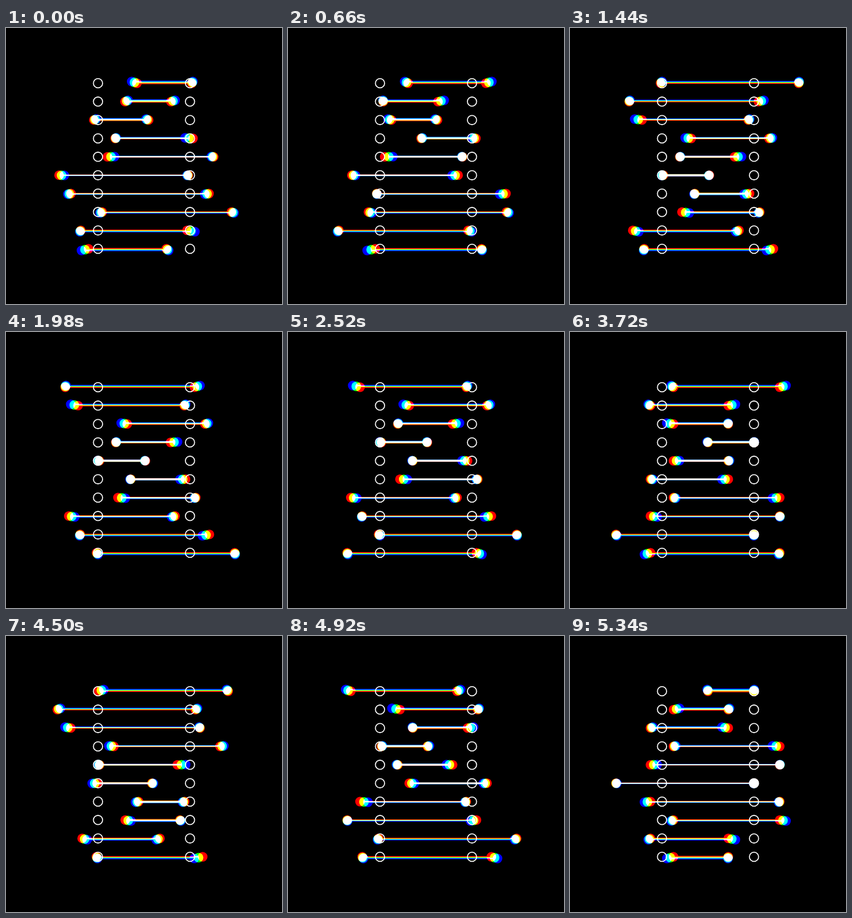
Animation, 500 px wide and 500 px high, one loop 5.4 s. Source, as an HTML page with a canvas:

```html
<!DOCTYPE html>
<html lang="en">
<head>
<meta charset="utf-8">
<title>Coupled oscillators</title>
<style>
html, body { margin: 0; width: 100%; height: 100%; overflow: hidden; background: #000; }
canvas { display: block; width: 500px; height: 500px; }
</style>
</head>
<body>
<canvas id="stage" width="500" height="500"></canvas>
<script>
const ctx = document.getElementById("stage").getContext("2d");
const TAU = Math.PI * 2;
const STEPS = 90, STEP_MS = 60;
const ROWS = 10, GAP = 100 / 3;
const LEFT = 500 / 3, RIGHT = 1000 / 3, SWING = 250 / 3;
const DOT = 8.7, RING = 25 / 3;

// Each colour runs slightly ahead of the previous one and is spread further vertically.
const CHANNELS = [
  { color: "#f00", lead: 0, spread: 1 },
  { color: "#0f0", lead: 1 / 6, spread: 1.01 },
  { color: "#00f", lead: 1 / 3, spread: 1.02 }
];

const rowY = row => 100 + row * GAP;

function circle(x, y, r) {
  ctx.beginPath();
  ctx.arc(x, y, r, 0, TAU);
}

function dot(x, y) {
  circle(x, y, DOT);
  ctx.fill();
}

function ring(x, y) {
  circle(x, y, RING);
  ctx.stroke();
}

function drawPair(row, step, { color, lead, spread }) {
  const a = TAU * ((step + 1 + lead) / STEPS + row / ROWS);
  const x1 = LEFT + SWING * Math.cos(a) * Math.cos(8 * a);
  const x2 = RIGHT + SWING * Math.sin(a) * Math.sin(8 * a);
  const y = 250 + (rowY(row) - 250) * spread;
  ctx.fillStyle = ctx.strokeStyle = color;
  // The link thins as it stretches.
  ctx.lineWidth = 36.5 / Math.sqrt(x2 - x1);
  ctx.beginPath();
  ctx.moveTo(x1, y);
  ctx.lineTo(x2, y);
  ctx.stroke();
  dot(x1, y);
  dot(x2, y);
}

function draw(step) {
  ctx.globalCompositeOperation = "source-over";
  ctx.fillStyle = "#000";
  ctx.fillRect(0, 0, 500, 500);
  ctx.globalCompositeOperation = "lighter";
  for (const channel of CHANNELS) {
    for (let row = 0; row < ROWS; row++) drawPair(row, step, channel);
  }
  ctx.strokeStyle = "#fff";
  ctx.lineWidth = 1.8;
  for (let row = 0; row < ROWS; row++) {
    ring(LEFT, rowY(row));
    ring(RIGHT, rowY(row));
  }
}

const start = performance.now();
function tick() {
  const elapsed = Math.max(0, performance.now() - start);
  draw(Math.floor(elapsed / STEP_MS) % STEPS);
  requestAnimationFrame(tick);
}
tick();
</script>
</body>
</html>
```
